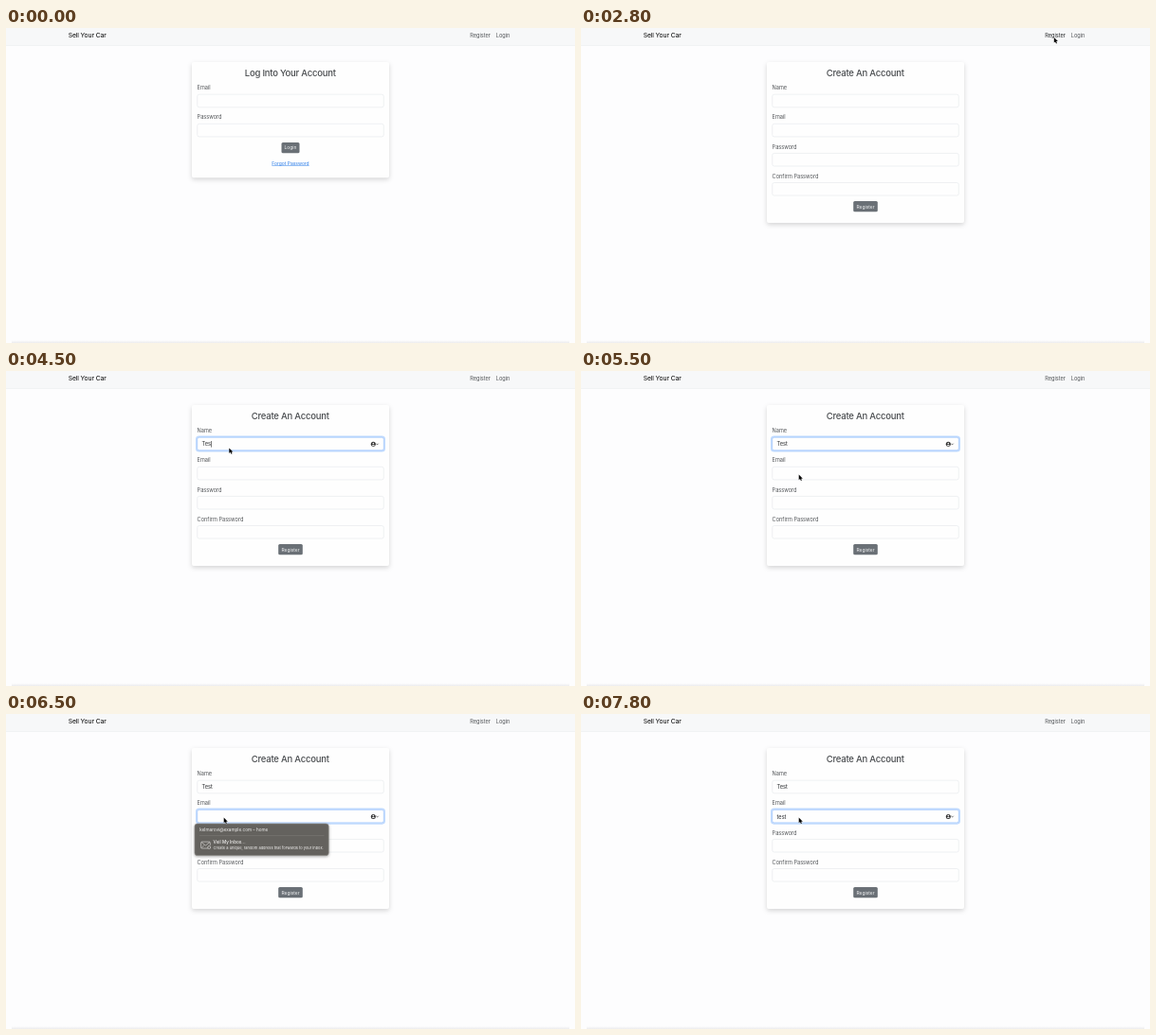
Animation, 600 px wide and 333 px high, one loop 8000 ms. Source, as an HTML page:

```html
<!DOCTYPE html>
<html lang="en">
<head>
<meta charset="utf-8">
<title>Sell Your Car</title>
<style>
  html, body { margin: 0; width: 100%; height: 100%; overflow: hidden; background: #fdfdfe; }
  svg { display: block; width: 100vw; height: 100vh; }
  text { font-family: Inter, "Noto Sans", sans-serif; font-size: 5.6px; fill: #505356; white-space: pre; }
  .brand { font-size: 6.8px; letter-spacing: -.12px; fill: #000; }
  .title { font-size: 9.5px; font-weight: 500; letter-spacing: -.22px; text-anchor: middle; fill: #484b4e; }
  .small { font-size: 4.95px; text-anchor: middle; }
  .btn { fill: #f4f5f6; }
  .link { fill: #2b7de9; text-decoration: underline; }
  .typed { font-size: 5.6px; fill: #26292c; }
  .card { fill: #fefefe; filter: drop-shadow(0 2.4px 2.6px rgba(0, 0, 0, .16)); }
  .field { fill: #fefefe; stroke: #dfe2e6; stroke-width: .5; }
  .popup text { fill: #f3f2f1; }
</style>
</head>
<body>
<svg id="stage" viewBox="0 0 600 333" preserveAspectRatio="none">
  <defs>
    <linearGradient id="dock" x1="0" y1="0" x2="0" y2="1">
      <stop offset="0" stop-color="#fdfdfe"/><stop offset="1" stop-color="#ececee"/>
    </linearGradient>
  </defs>
  <rect width="600" height="333" fill="#fdfdfe"/>
  <rect width="600" height="18.5" fill="#f7f8f9"/>
  <rect y="18" width="600" height=".6" fill="#eceef0"/>
  <rect x="6" y="330" width="588" height="3" fill="url(#dock)"/>
  <text class="brand" x="65.7" y="10.4">Sell Your Car</text>
  <text id="navRegister" x="489.3" y="10.1">Register</text>
  <text x="516.8" y="10.1">Login</text>

  <g id="login"></g>
  <g id="register"></g>

  <g id="focus">
    <rect x="200.7" y="69.2" width="198.6" height="15.6" rx="2.8" fill="none" stroke="#c2dbfe" stroke-width="1.5"/>
    <rect x="201.7" y="70.2" width="196.6" height="13.6" rx="2" fill="#fefefe" stroke="#86b7fe" stroke-width=".6"/>
    <circle cx="387.3" cy="77.3" r="2.5" fill="#333"/>
    <circle cx="387.3" cy="76.5" r=".85" fill="#fff"/>
    <path d="M385.7 78.9a1.7 1.4 0 0 1 3.2 0z" fill="#fff"/>
    <path d="M390.3 76.7l1.2 1.2 1.2-1.2" fill="none" stroke="#333" stroke-width=".7"/>
  </g>
  <text id="name" class="typed" x="206.6" y="79.4"></text>
  <text id="email" class="typed" x="206.6" y="110.5"></text>
  <rect id="caret" width=".6" height="6.6" fill="#222"/>

  <g id="popup" class="popup">
    <rect x="199" y="116" width="141.2" height="33.6" rx="2.8" fill="#64625e" stroke="#8a8884" stroke-width=".6"
      style="filter:drop-shadow(0 1px 1.6px rgba(0,0,0,.35))"/>
    <text x="204.2" y="124.2" style="font-size:4.65px">kelmarovi@example.com – home</text>
    <rect x="204" y="128" width="131.5" height=".4" fill="#85837f"/>
    <g fill="none" stroke="#e4e3e1" stroke-width=".6">
      <path d="M213 142h-6.3q-1.1 0-1.1-1.1v-4.700q0-1.1 1.100-1.1h7.500q1.100 0 1.100 1.100v2.600"/>
      <path d="M206 135.500l4.450 3.500 4.450-3.500M206 141.600l3-3"/>
      <circle cx="214.200" cy="141" r="1.500"/>
    </g>
    <text x="218.6" y="137.200" style="font-size:4.65px;font-weight:500">Veil My Inbox...</text>
    <text x="218.6" y="142.900" style="font-size:4px">Create a unique, random address that forwards to your inbox.</text>
  </g>

  <path id="cursor" d="M0 0V5.600L1.300 4.400 2.200 6.400 3.200 6 2.300 4.100H4.100Z" fill="#000" stroke="#fff" stroke-width=".5" paint-order="stroke"/>
</svg>
<script>
const $ = id => document.getElementById(id);
const LOOP = 8000, ROW = 31.1;

const label = (s, i) => `<text x="201.600" y="${65.3 + i * ROW}">${s}</text>
  <rect class="field" x="201.750" y="${70.2 + i * ROW}" width="196.500" height="13.600" rx="2"/>`;
const button = (s, y, w) => `<rect x="${300 - w / 2}" y="${y}" width="${w}" height="11.200" rx="1.500" fill="#6a7076"/>
  <text class="small btn" x="300" y="${y + 7.4}">${s}</text>`;
const card = (title, labels, h) => `<rect class="card" x="196" y="36" width="208" height="${h}" rx="2"/>
  <text class="title" x="299.800" y="51">${title}</text>` + labels.map(label).join("");

$("login").innerHTML = card("Log Into Your Account", ["Email", "Password"], 122.2)
  + button("Login", 121, 19) + '<text class="small link" x="300" y="144.500">Forgot Password</text>';
$("register").innerHTML = card("Create An Account", ["Name", "Email", "Password", "Confirm Password"], 170)
  + button("Register", 183.1, 25.6);

// Each track is a list of [start ms, value]; a value holds until the next.
const tracks = {
  cursor: [[0, null], [800, [301, 40]], [1000, [446.7, 12.5]], [1300, [480, 16]], [1500, [500.7, 18.7]],
    [1800, [501.2, 11.2]], [2000, [501, 10.5]], [2300, [498.8, 10]], [3000, [243, 77]],
    [3300, [235.3, 81.4]], [5300, [231, 103]], [5500, [229.7, 109.6]]],
  page: [[0, "login"], [2800, "register"]],
  hover: [[0, 0], [2300, 1], [3000, 0]],
  row: [[0, -1], [3300, 0], [5800, 1]],
  glow: [[0, 0], [3300, .6], [3500, 1], [5800, .6], [6000, 1]],
  name: [[0, ""], [4300, "Te"], [4500, "Tes"], [4800, "Test"]],
  email: [[0, ""], [7000, "te"], [7300, "test"]],
  caret: [[0, 0], [3800, 1], [5300, 0], [5800, 1], [6300, 0], [7000, 1], [7800, 0]],
  popup: [[0, 0], [6300, 1], [7000, 0]]
};
const at = (key, t) => tracks[key].reduce((v, [start, next]) => t >= start ? next : v, null);
const show = (id, on) => $(id).style.display = on ? "" : "none";

function draw(t) {
  const page = at("page", t), row = at("row", t), pos = at("cursor", t);
  show("login", page === "login");
  show("register", page === "register");
  $("navRegister").style.fill = at("hover", t) ? "#222426" : "";

  for (const id of ["name", "email"]) {
    const s = at(id, t);
    if ($(id).textContent !== s) $(id).textContent = s;
  }

  show("focus", row >= 0);
  $("focus").setAttribute("transform", `translate(0 ${Math.max(row, 0) * ROW})`);
  $("focus").style.opacity = at("glow", t);

  show("caret", at("caret", t));
  if (row >= 0) {
    const field = $(row ? "email" : "name");
    const w = field.textContent ? field.getComputedTextLength() : 0;
    $("caret").setAttribute("x", 206.6 + w);
    $("caret").setAttribute("y", 74 + row * ROW);
  }

  show("popup", at("popup", t));
  show("cursor", pos);
  if (pos) $("cursor").setAttribute("transform", `translate(${pos})`);
}

const begin = performance.now();
function tick() {
  draw((performance.now() - begin) % LOOP);
  requestAnimationFrame(tick);
}
tick();
</script>
</body>
</html>
```
